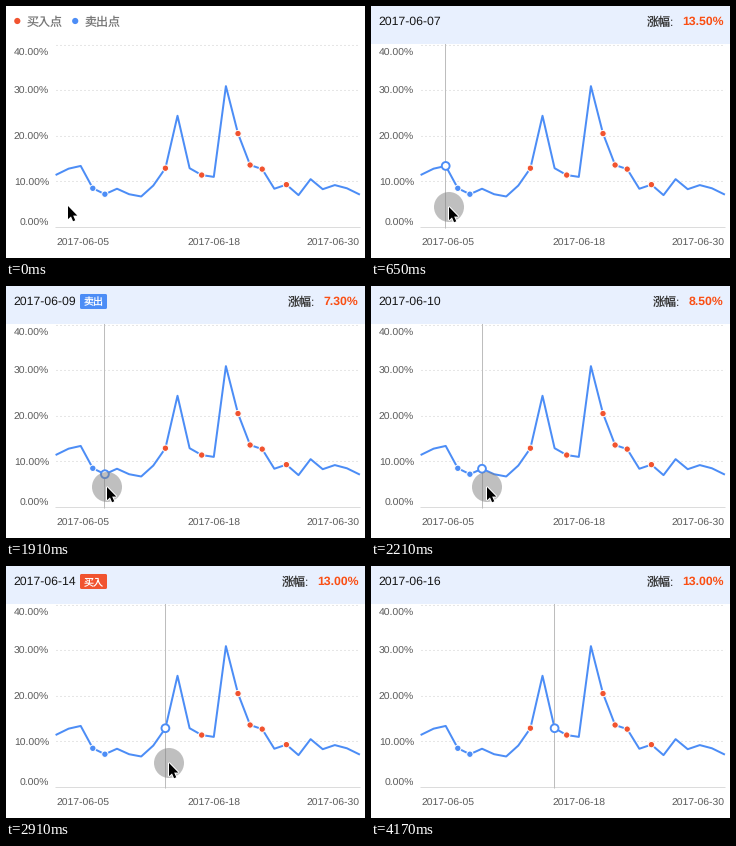
Animation, 359 px wide and 252 px high, one loop 4.63 s. Source, as a matplotlib script:

```python
import numpy as np
import matplotlib.pyplot as plt
from matplotlib.animation import FuncAnimation
from matplotlib.patches import Circle, FancyBboxPatch, Polygon, Rectangle

plt.rcParams.update({"font.family": ["Liberation Sans", "Noto Sans CJK JP"],
                     "text.hinting": "none", "path.snap": False})

W, H = 359, 252
LOOP, STEP = 4630, 10
BLUE, RED, ORANGE = "#4c8df6", "#f1532f", "#fa4f14"
INK, GREY = "#161616", "#5a5a5a"

# Daily rise in percent, 5 to 30 June
RISE = np.array([11.6, 12.9, 13.5, 8.6, 7.3, 8.5, 7.3, 6.8, 9.2, 13.0, 24.5,
                 13.0, 11.5, 11.1, 31.0, 20.6, 13.7, 12.8, 8.5, 9.4, 7.1,
                 10.6, 8.4, 9.3, 8.6, 7.3])
BUY = [9, 12, 15, 16, 17, 19]
SELL = [3, 4]
X0, DX, Y0, DY = 50.5, 12.1, 221.5, 4.56
xs = X0 + DX * np.arange(len(RISE))
ys = Y0 - DY * RISE

# Drags: start, end, travel in x, easing power
DRAGS = ((180, 950, 24, 0.85), (1430, 2910, 77, 1.45), (3450, 3870, 15, 0.33))
PRESS, SHOW, RELEASE, LEAVE = 240, 300, 4110, 4170
# The 60 ms rhythm restarts at these times
BEATS = (240, 650, 2560, 2910)
ARROW = 0.94 * np.array([(0, 0), (0, 14), (3.2, 11.1), (5.4, 16.2),
                         (7.7, 15.2), (5.5, 10.2), (9.9, 10.2)])

fig = plt.figure(figsize=((W + 0.01) / 72, (H + 0.01) / 72), dpi=72,
                 facecolor="white")
ax = fig.add_axes([0, 0, 1, 1])
ax.set(xlim=(0, W), ylim=(H, 0))
ax.axis("off")


def label(x, y, s, size, color=GREY, ha="left", **style):
    return ax.text(x, y, s, size=size, color=color, ha=ha, va="baseline",
                   **{"zorder": 6, **style})


def disc(x, y, r, color, edge="none", lw=0, z=4, **style):
    return ax.add_patch(Circle((x, y), r, fc=color, ec=edge, lw=lw, zorder=z,
                               **style))


# Grid, axis and labels
for i in range(5):
    pct, y = 40 - 10 * i, int(39 + 45.6 * i) + 0.5
    style = {"dashes": (2, 2), "color": "#e6e6e6"} if pct else {"color": "#dcdcdc"}
    ax.plot([50, 354], [y, y], lw=1, zorder=1, **style)
    # The outer labels stay inside the plot
    shift = 6 if pct == 40 else -6 if pct == 0 else 0
    label(43, round(y + 4 + shift), f"{pct:.2f}%", 10.4, ha="right")
for x, day, ha in ((50, 5, "left"), (208, 18, "center"), (353.5, 30, "right")):
    label(x, 240, f"2017-06-{day:02d}", 10.4, ha=ha)

# Curve and trade points
ax.plot(xs, ys, color=BLUE, lw=2, solid_joinstyle="round", zorder=2)
for i in BUY + SELL:
    disc(xs[i], ys[i], 3.2, RED if i in BUY else BLUE, "white", 1)

legend = []
for x, color, s in ((11.3, RED, "买入点"), (69.2, BLUE, "卖出点")):
    legend.append(disc(x, 15, 3.1, color))
    legend.append(label(x + 8.9, 19.5, s, 12, "#777777", weight="light"))

# Tooltip header and tracking marks
header = ax.add_patch(Rectangle((0, 0), W, 38, fc="#e8f0fe", lw=0, zorder=5))
date = label(7.7, 19.3, "", 12.2, INK)
rise = label(352.5, 19.3, "", 12.2, ORANGE, "right", weight="bold")
caption = label(0, 19.5, "涨幅:", 12, "#333333", weight="light")
badge = ax.add_patch(FancyBboxPatch((75, 9), 25, 13, lw=0, zorder=6,
                                    boxstyle="round,pad=1,rounding_size=1.5"))
trade = label(87.5, 19.4, "", 10, "white", "center", weight="light", zorder=7)
track, = ax.plot([], [], color="#bdbdbd", lw=1, zorder=3)
ring = disc(0, 0, 3.9, "white", BLUE, 1.9, 5)
tooltip = [header, date, rise, caption, track, ring]

touch = disc(0, 0, 15, "#808080", z=8, alpha=0.5)
halo = ax.add_patch(Polygon(ARROW, fc="white", ec="white", lw=2, zorder=9))
arrow = ax.add_patch(Polygon(ARROW, fc="black", lw=0, zorder=10))


def show(items, on):
    for item in items:
        item.set_visible(bool(on))


def beat(t):
    """Hold the time at the last tick of the rhythm."""
    start = max((b for b in BEATS if b <= t), default=0)
    return start + (t - start) // 60 * 60 if start else 0


def pointer(t):
    x = 62
    for start, end, travel, power in DRAGS:
        x += travel * np.clip((t - start) / (end - start), 0, 1) ** power
    x = round(x)
    return x, round(201 - ((x - 92) / 35) ** 2)


def update(frame):
    t = beat(frame * STEP)
    x, y = pointer(t)
    tip = (x, y) if t < RELEASE else (223, 218)
    show([touch], PRESS <= t < RELEASE)
    show([halo, arrow], t < LEAVE)
    touch.center = x, y
    for shape in (halo, arrow):
        shape.set_xy(ARROW + tip)

    on = t >= SHOW
    show(legend, not on)
    show(tooltip, on)
    i = round((x - X0) / DX)
    date.set_text(f"2017-06-{i + 5:02d}")
    value = f"{RISE[i]:.2f}%"
    rise.set_text(value)
    caption.set_x(275.5 if len(value) == 6 else 282)
    show([badge, trade], on and i in BUY + SELL)
    badge.set_facecolor(RED if i in BUY else BLUE)
    trade.set_text("买入" if i in BUY else "卖出")
    mid = int(xs[i]) + 0.5
    track.set_data([mid, mid], [38, 222])
    ring.center = xs[i], ys[i]
    return tooltip + legend + [badge, trade, touch, halo, arrow]


anim = FuncAnimation(fig, update, frames=LOOP // STEP, interval=STEP,
                     repeat=True, repeat_delay=0, blit=False,
                     init_func=lambda: update(0))
plt.show()
```
